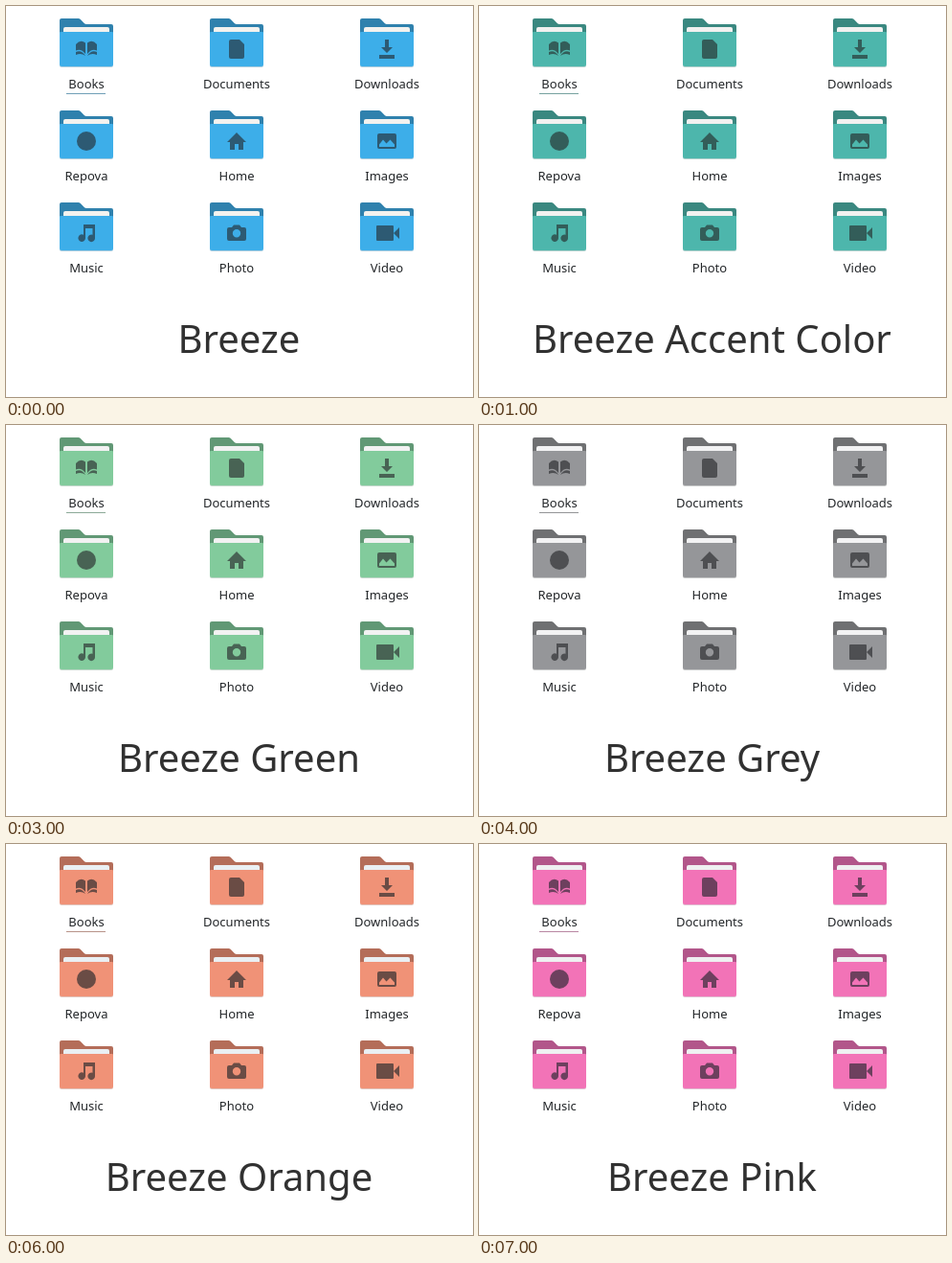
Animation, 488 px wide and 408 px high, one loop 8000 ms. Source, as an HTML page:

```html
<!DOCTYPE html>
<html lang="en">
<head>
<meta charset="utf-8">
<title>Breeze folder colours</title>
<style>
  html, body { margin: 0; width: 100%; height: 100%; overflow: hidden; background: #fff; }
  svg { display: block; width: 488px; height: 408px; animation: tint 8s step-end infinite; }
  text { font-family: "Noto Sans", sans-serif; text-anchor: middle; }
  .label { font-size: 13px; fill: #232629; }
  .title { font-size: 40px; fill: #313131; visibility: hidden; animation: show 8s step-end infinite; }
  .back { fill: var(--back); }
  .paper { fill: var(--paper); }
  .front { fill: var(--front); }
  .edge { fill: var(--back); opacity: .4; }
  .icon { fill: var(--icon); }
  .rule { fill: #929496; }
  .glow { fill: var(--front); opacity: .4; }

  @keyframes tint {
    0%    { --front: #3daee9; --back: #2f81ad; --icon: #2d5a73; --paper: #f3f2ef; }
    12.5% { --front: #4db6ac; --back: #3a8880; --icon: #335d59; --paper: #f2f1f0; }
    25%   { --front: #78c6f0; --back: #5a94b3; --icon: #436072; --paper: #f2f2f0; }
    37.5% { --front: #82cb9c; --back: #619875; --icon: #486354; --paper: #f2f2f2; }
    50%   { --front: #959699; --back: #6f7072; --icon: #4e4f52; --paper: #f2f2f3; }
    62.5% { --front: #cd9ee7; --back: #9a77ad; --icon: #60526d; --paper: #f1f2f3; }
    75%   { --front: #f09277; --back: #b46d59; --icon: #6a4c45; --paper: #eaeff3; }
    87.5%, 100% { --front: #f273b7; --back: #b2568a; --icon: #6d405e; --paper: #eff0f1; }
  }
  @keyframes show {
    0% { visibility: visible; }
    12.5%, 100% { visibility: hidden; }
  }
</style>
</head>
<body>
<svg id="stage" viewBox="0 0 488 408">
  <defs>
    <g id="folder">
      <path class="back" d="M0 2Q0 0 2 0H19.5Q20.8 0 21.6 .8L26 5.2Q26.8 6 28 6H54Q56 6 56 8V20H0Z"/>
      <path class="paper" d="M4 18V11Q4 9 6 9H50Q52 9 52 11V18Z"/>
      <path class="edge" d="M0 48V49Q0 51 2 51H54Q56 51 56 49V48Z"/>
      <path class="front" d="M0 15Q0 14 1 14H55Q56 14 56 15V48Q56 50 54 50H2Q0 50 0 48Z"/>
    </g>
    <g id="wing" class="icon">
      <path d="M17 27Q22 21.5 27 25.5V37Q22.5 31 17 33.5Z"/>
      <path d="M17 35Q23 32.5 27 39Q22.5 35.5 17 38Z"/>
    </g>
    <g id="Books">
      <use href="#wing"/>
      <use href="#wing" transform="matrix(-1 0 0 1 56 0)"/>
    </g>
    <path id="Documents" class="icon" d="M20 24Q20 22 22 22H31L36 27V40Q36 42 34 42H22Q20 42 20 40Z"/>
    <path id="Downloads" class="icon" d="M26 22H30V30H34L28 36L22 30H26ZM20 38H36V42H20Z"/>
    <circle id="Repova" class="icon" cx="28" cy="32" r="10"/>
    <path id="Home" class="icon" d="M28 23L38 33H35V41H30V35H26V41H21V33H18Z"/>
    <path id="Images" class="icon" fill-rule="evenodd" d="M20 24H36Q38 24 38 26V38Q38 40 36 40H20Q18 40 18 38V26Q18 24 20 24ZM20 38H36V35.5L31.5 30.5L27.5 34.5L24 30.5L20 35.5Z"/>
    <path id="Music" class="icon" d="M25 23H37V37.2A3.8 3.8 0 1 1 34.5 33.8V27H27V37.2A3.8 3.8 0 1 1 25 33.8Z"/>
    <path id="Photo" class="icon" fill-rule="evenodd" d="M25 23.5H31L33 26H36Q38 26 38 28V38Q38 40 36 40H20Q18 40 18 38V28Q18 26 20 26H23ZM28 28A4.2 4.2 0 1 0 28 36.4A4.2 4.2 0 1 0 28 28Z"/>
    <path id="Video" class="icon" d="M18 24H34Q35 24 35 25V39Q35 40 34 40H18Q17 40 17 39V25Q17 24 18 24ZM35 32L41 26V38Z"/>
  </defs>
  <path class="rule" d="M63 91H104V92H63Z"/>
  <path class="glow" d="M63 91H104V92H63Z"/>
</svg>
<script>
  const stage = document.getElementById("stage");
  const folders = ["Books", "Documents", "Downloads", "Repova", "Home", "Images", "Music", "Photo", "Video"];
  const tints = ["", " Accent Color", " Blue", " Green", " Grey", " Magenta", " Orange", " Pink"];

  function add(tag, attrs, text = "") {
    const el = document.createElementNS("http://www.w3.org/2000/svg", tag);
    for (const key in attrs) el.setAttribute(key, attrs[key]);
    el.textContent = text;
    stage.append(el);
  }

  folders.forEach((name, i) => {
    const x = 56 + (i % 3) * 157;
    const y = 13 + Math.floor(i / 3) * 96;
    add("use", { href: "#folder", x, y });
    add("use", { href: "#" + name, x, y });
    add("text", { class: "label", x: x + 28, y: y + 73 }, name);
  });

  tints.forEach((tint, i) => {
    const style = `animation-delay: ${i ? i - 8 : 0}s`;
    add("text", { class: "title", x: 243.5, y: 362, style }, "Breeze" + tint);
  });
</script>
</body>
</html>
```
